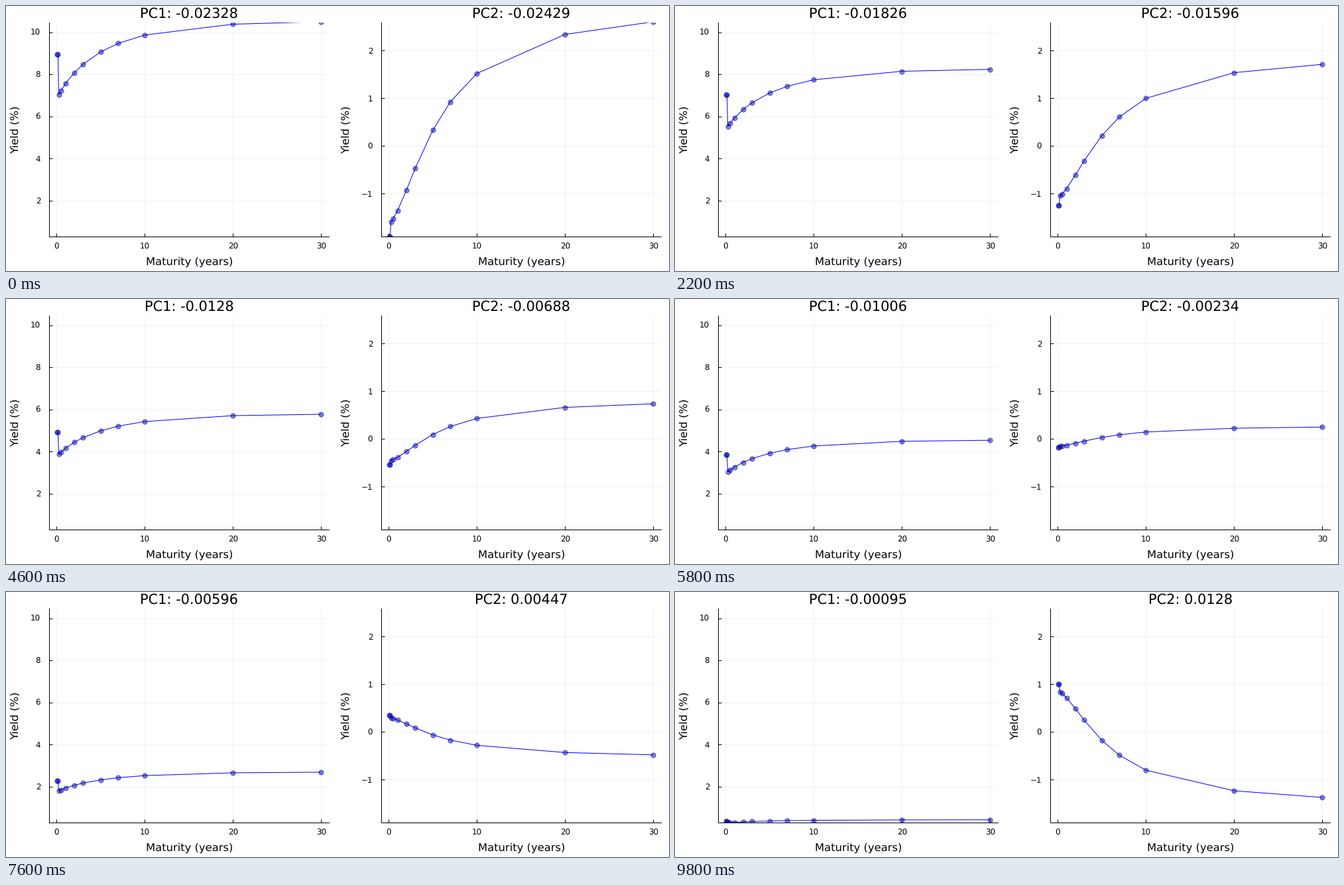
Recreate the animation shown at these times as a matplotlib script. Size 1000 by 400 pixels, loop 10000 ms.

```python
import numpy as np
import matplotlib.pyplot as plt
from matplotlib.animation import FuncAnimation

W, H, DPI = 1000, 400, 100
FRAMES, INTERVAL = 50, 200
PT = 72 / DPI  # points per pixel
TOP, BOTTOM, WIDTH = 24.5, 348.3, 421.8

plt.rcParams.update({"font.family": "DejaVu Sans", "text.hinting": "none"})

maturity = np.array([1 / 12, 1 / 6, 0.25, 0.5, 1, 2, 3, 5, 7, 10, 20, 30])


def level_curve(m):
    """Saturating rise; the bills under three months sit apart."""
    rise = 10.55 - 3.75 * np.exp(-(m / 5.41) ** 0.88)
    return np.where(m < 0.25, 8.95, rise)


def slope_curve(m):
    """S-shaped rise, with a slightly lower start for the short bills."""
    x = (m / 6.04) ** 1.56
    return np.where(m < 0.25, -1.903, -1.62 + 4.57 * x / (1 + x))


fig = plt.figure(figsize=(W / DPI, H / DPI), dpi=DPI, facecolor="white")


def label(x, y, text, size, ha="center", **kw):
    """Put text with its baseline at pixel (x, y) from the top left."""
    return fig.text(x / W, 1 - y / H, text, fontsize=size * PT,
                    ha=ha, va="baseline", **kw)


def score_text(value):
    """Five decimals, no trailing zeros, short exponent for tiny values."""
    value = round(value, 5)
    if 0 < abs(value) < 1e-4:
        mantissa, exponent = f"{value:.1e}".split("e")
        return f"{mantissa}e{int(exponent)}"
    return str(value)


class Panel:
    def __init__(self, name, left, curve, scores, ylim, yticks, guide_x):
        self.name, self.curve = name, curve(maturity)
        self.scores = np.linspace(*scores, FRAMES)
        xticks = range(0, 31, 10)
        ax = fig.add_axes([left / W, 1 - BOTTOM / H,
                           WIDTH / W, (BOTTOM - TOP) / H])
        pad = 0.03 * np.ptp(maturity)
        ax.set_xlim(maturity[0] - pad, maturity[-1] + pad)
        ax.set_ylim(*ylim)
        ax.set_xticks(xticks, labels=[])
        ax.set_yticks(yticks, labels=[])
        ax.tick_params(direction="in", length=5 * PT, width=PT)
        ax.grid(color="black", alpha=0.1, linewidth=0.5 * PT)
        ax.set_axisbelow(True)
        ax.patch.set_visible(False)
        ax.spines[["top", "right"]].set_visible(False)
        ax.spines[["left", "bottom"]].set_linewidth(PT)

        x0, x1 = ax.get_xlim()
        for t in xticks:
            label(left + (t - x0) / (x1 - x0) * WIDTH, 367.3, str(t), 11.9)
        y0, y1 = ylim
        for t in yticks:
            y = BOTTOM - (t - y0) / (y1 - y0) * (BOTTOM - TOP)
            label(left - 13.2, y + 4.4, str(t).replace("-", "\u2212"), 11.9,
                  ha="right")

        mid = left + WIDTH / 2
        label(mid, 390.3, "Maturity (years)", 16.4)
        label(guide_x, 186.3, "Yield (%)", 16.4,
              rotation=90, rotation_mode="anchor")
        self.title = label(mid, 18, "", 20.9)
        self.line, = ax.plot([], [], color="blue", linewidth=PT)
        self.dots, = ax.plot([], [], "o", markersize=7.2 * PT,
                             markerfacecolor=(0, 0, 1, 0.5),
                             markeredgecolor=(0, 0, 0, 0.5),
                             markeredgewidth=PT, snap=False)

    def draw(self, i):
        score = self.scores[i]
        y = self.curve * score / self.scores[0]
        self.line.set_data(maturity, y)
        self.dots.set_data(maturity, y)
        self.title.set_text(f"{self.name}: {score_text(float(score))}")
        return [self.line, self.dots, self.title]


panels = [
    Panel("PC1", 65.4, level_curve, (-0.023276, -0.000948),
          (0.287, 10.485), range(2, 11, 2), 19),
    Panel("PC2", 566.4, slope_curve, (-0.024288, 0.012801),
          (-1.903, 2.594), range(-1, 3), 518),
]


def update(i):
    return [artist for panel in panels for artist in panel.draw(i)]


anim = FuncAnimation(fig, update, frames=FRAMES, interval=INTERVAL,
                     repeat=True, repeat_delay=0)
plt.show()
```
